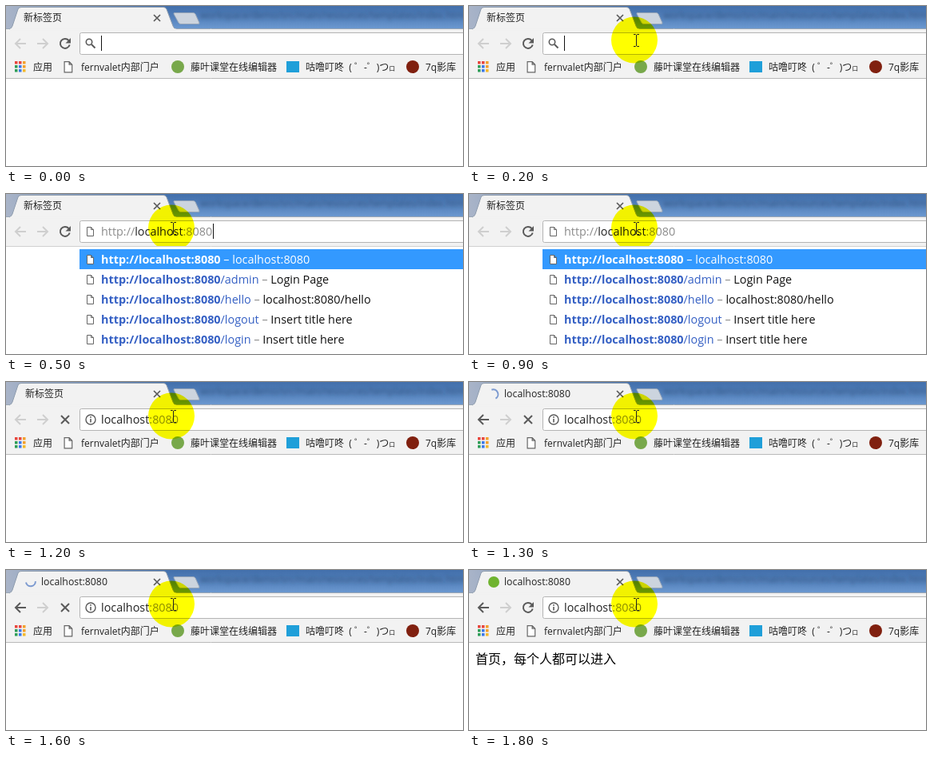
Animation, 572 px wide and 200 px high, one loop 3.1 s. Source, as an HTML page:

```html
<!DOCTYPE html>
<html lang="zh-CN">
<head>
<meta charset="utf-8">
<title>Browser</title>
<style>
html, body { margin: 0; width: 100%; height: 100%; overflow: hidden; background: #fff }
svg { display: block }
text { font: 12px "Open Sans", "Noto Sans CJK SC", sans-serif; fill: #222 }
.url text { font-size: 14.4px }
.dim { fill: #8c8c8c }
.line { fill: none; stroke: #5a5a5a; stroke-width: 2 }
.off { stroke: #cfcfcf }
.doc { fill: #fff; stroke: #666 }
#rows text { fill: #111 }
#rows .link { fill: #3560c4 }
#rows .sel, #rows .sel * { fill: #fff }
.bold { font-weight: 700 }
</style>
</head>
<body>
<svg width="572" height="200" viewBox="0 0 572 200">
  <defs>
    <linearGradient id="glass" x2="0" y2="1">
      <stop offset="0" stop-color="#426fab"/>
      <stop offset=".5" stop-color="#5380ba"/>
      <stop offset="1" stop-color="#6b98d0"/>
    </linearGradient>
    <linearGradient id="haze">
      <stop offset="0" stop-color="#a9b4c8"/>
      <stop offset="1" stop-color="#a9b4c8" stop-opacity="0"/>
    </linearGradient>
    <filter id="blur"><feGaussianBlur stdDeviation="2"/></filter>
    <path id="doc" class="doc" d="M.5 .5h5l3 3v8h-8zM5.5 .5v3h3"/>
    <path id="arrow" d="M7 0H-6M0 -6L-6 0L0 6"/>
  </defs>

  <rect width="572" height="28" fill="url(#glass)"/>
  <rect width="200" height="28" fill="url(#haze)"/>
  <text x="243" y="16" filter="url(#blur)" opacity=".6" style="fill:#1f3c60">workspace/demo/src/main/resources/templates/index.html - Editor</text>
  <path d="M0 28.5H572" stroke="#9aa7b6"/>
  <path d="M211 8.500H234Q236 8.500 237 10L242 21Q242.500 22.500 240 22.500H219Q217 22.500 216 21L210 10Q209.500 8.500 211 8.500Z" fill="#ccd4de" stroke="#96a5b8"/>
  <rect y="29" width="572" height="61" fill="#f2f2f2"/>
  <path d="M4 29Q7 28 8 25L15 4Q16 1.500 19 1.500H197Q200 1.500 201 4L209 25Q210 28 213 29" fill="#f2f2f2" stroke="#8f9dae"/>
  <path d="M5 29.5H213" stroke="#f2f2f2" stroke-width="2"/>
  <path d="M0 90.5H572" stroke="#b9b9b9"/>

  <text id="blankTitle" y="19">新标签页</text>
  <g id="siteTitle">
    <text x="44" y="19" style="font-size:12.3px">localhost:8080</text>
    <path id="spin" d="M4.200 -4.200A6 6 0 0 1 -4.500 4" fill="none" stroke="#7c9ad0" stroke-width="2"/>
    <circle id="icon" cx="31" cy="15" r="7" fill="#6fb32f"/>
  </g>
  <path d="M185 11l8 8m0-8l-8 8" class="line" style="stroke-width:1.7"/>

  <use id="back" href="#arrow" class="line" transform="translate(18 47)"/>
  <use href="#arrow" class="line off" transform="translate(46 47) scale(-1 1)"/>
  <g id="reload">
    <path class="line" d="M78.500 43A6 6 0 1 0 79.700 48.500"/>
    <path d="M81 40v6.500h-6.500z" fill="#5a5a5a"/>
  </g>
  <path id="stop" class="line" d="M69 42l10 10m0-10l-10 10"/>

  <rect x="92.5" y="33.5" width="500" height="27" rx="2" fill="#fff" stroke="#b4b4b4"/>
  <g id="search" class="line">
    <circle cx="104" cy="45" r="3.700" style="stroke-width:1.600"/>
    <path d="M107 48l4.500 4.500"/>
  </g>
  <g id="typed" class="url">
    <use href="#doc" x="101" y="41"/>
    <text x="119" y="52" style="fill:#8c8c8c">http://<tspan fill="#222">localhost</tspan>:8080</text>
  </g>
  <g id="loaded" class="url">
    <circle cx="106" cy="47" r="6" class="line" style="stroke-width:1.400"/>
    <path d="M106 46v4.500M106 43v1.700" class="line" style="stroke-width:1.600"/>
    <text x="119" y="52">localhost<tspan class="dim">:8080</tspan></text>
  </g>
  <path id="caret" stroke="#111" d="M.5 37v19"/>

  <g id="marks">
    <g id="apps"></g>
    <text x="34" y="81">应用</text>
    <use href="#doc" transform="translate(72.500 69) scale(1.200)"/>
    <text x="94" y="81">fernvalet内部门户</text>
    <circle cx="215" cy="76" r="8" fill="#78a84b"/>
    <text x="231" y="81">藤叶课堂在线编辑器</text>
    <rect x="351" y="69" width="16" height="14" fill="#1f9fd9"/>
    <text x="375" y="81">咕噜叮咚&nbsp; (&nbsp;゜-゜)つ<tspan style="font-size:8px">ロ</tspan></text>
    <circle cx="509" cy="76" r="8" fill="#80200f"/>
    <text x="525" y="81">7q影库</text>
  </g>
  <text id="page" x="8" y="117" style="font-size:16px;fill:#000">首页，每个人都可以进入</text>

  <circle class="mouse" cx="207" cy="42.500" r="29" fill="#ff0" style="mix-blend-mode:multiply"/>
  <g id="rows" class="url">
    <rect y="65" width="572" height="135" fill="#fff"/>
    <path d="M0 65.500H572" stroke="#d0d0d0"/>
    <rect x="92" y="69" width="480" height="25" fill="#3399ff"/>
  </g>
  <path class="mouse" d="M206 35.500h2.500l1 1l1-1h2.500M209.500 36v14M206 50.500h2.500l1-1l1 1h2.500" fill="none" stroke="#222"/>
</svg>
<script>
const LOOP = 3100;
const $ = id => document.getElementById(id);

const colors = ['#e8453c', '#e8453c', '#f3a02c', '#2f9e58', '#3b78e7', '#f3a02c', '#2f9e58', '#3b78e7', '#f3b92c'];
$('apps').innerHTML = colors.map((c, i) =>
  `<rect x="${11 + i % 3 * 5}" y="${69 + Math.floor(i / 3) * 5}" width="3.500" height="3.500" fill="${c}"/>`).join('');

const hits = [
  ['', 'localhost:8080'],
  ['/admin', 'Login Page'],
  ['/hello', 'localhost:8080/hello'],
  ['/logout', 'Insert title here'],
  ['/login', 'Insert title here']
];
$('rows').innerHTML += hits.map(([path, title], i) => {
  const y = 87 + i * 25;
  return `<use href="#doc" x="101" y="${y - 11}"/>
    <text x="119" y="${y}" class="${i ? '' : 'sel'}"><tspan class="link bold">http://localhost:8080</tspan><tspan class="link">${path}</tspan><tspan class="dim"> – </tspan>${title}</text>`;
}).join('');

function show(el, on) {
  el.style.visibility = on ? 'visible' : 'hidden';
}

function draw() {
  const t = performance.now() % LOOP;
  const typing = t >= 300 && t < 1200;
  const visiting = t >= 1200;
  const titled = t >= 1300;
  const done = t >= 1700;

  document.querySelectorAll('.mouse').forEach(el => show(el, t >= 100));
  show($('search'), t < 300);
  show($('typed'), typing);
  show($('rows'), typing);
  show($('marks'), !typing);
  show($('loaded'), visiting);
  show($('caret'), t < 900);
  $('caret').setAttribute('transform', `translate(${typing ? 259 : 119})`);

  show($('blankTitle'), !titled);
  $('blankTitle').setAttribute('x', visiting ? 24 : 22);
  show($('siteTitle'), titled);
  show($('spin'), titled && !done);
  $('spin').setAttribute('transform', `translate(31 15) rotate(${(t - 1500) * .36})`);
  show($('icon'), done);
  $('back').setAttribute('class', titled ? 'line' : 'line off');
  show($('stop'), visiting && !done);
  show($('reload'), !visiting || done);
  show($('page'), done);
  requestAnimationFrame(draw);
}
draw();
</script>
</body>
</html>
```
